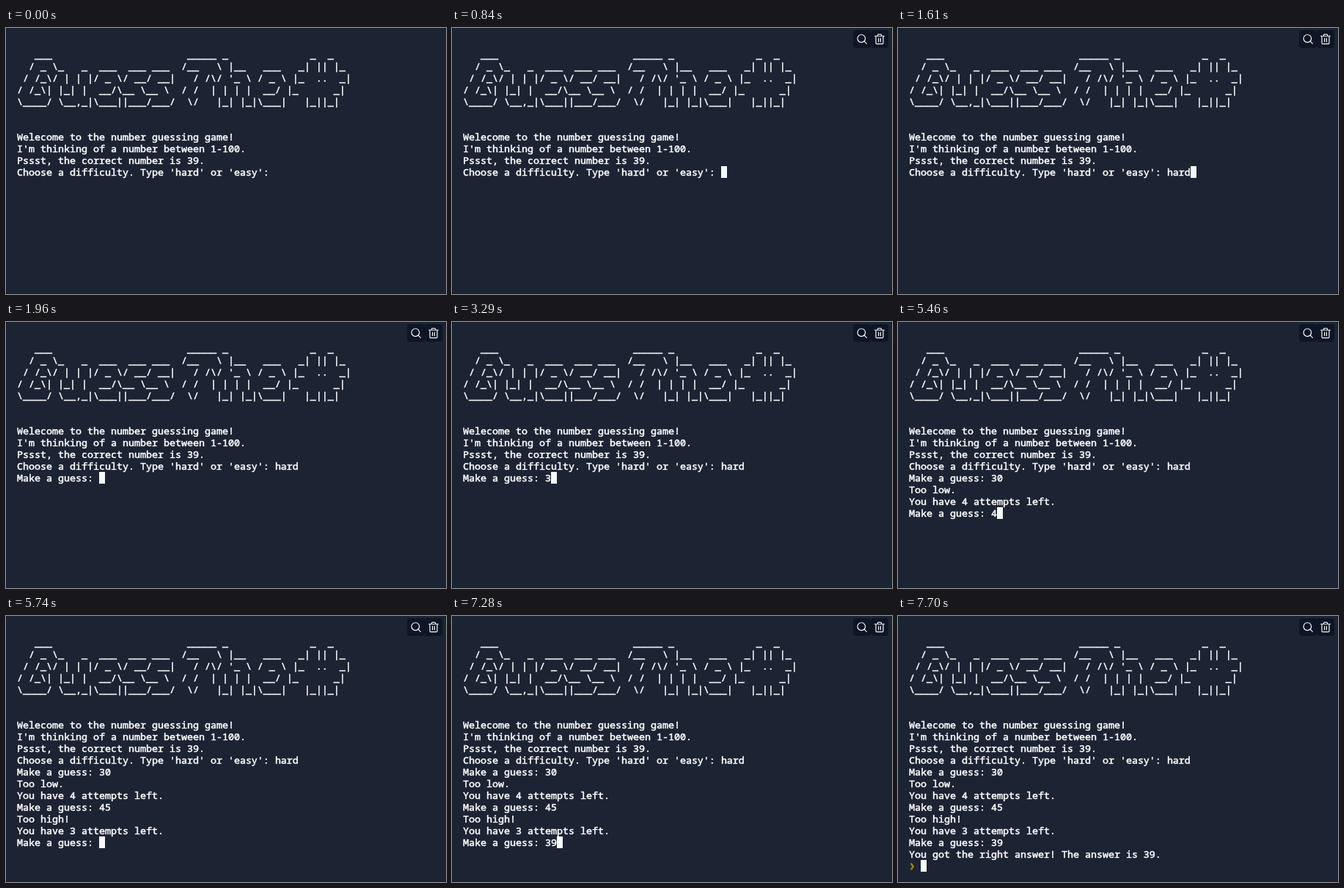
Recreate the animation shown at these times as an HTML page. Size 600 by 362 pixels, loop 8.82 s.

```html
<!DOCTYPE html>
<html lang="en">
<head>
<meta charset="utf-8">
<title>Number guessing game</title>
<style>
  html, body { margin: 0; width: 100%; height: 100%; overflow: hidden; background: #0e1525; }
  #terminal { position: relative; width: 600px; height: 362px; background: #1c2333; border-radius: 4px; }
  pre {
    position: absolute; left: 15px; top: 28px; margin: 0;
    font: 500 13.3333px/16px "Noto Sans Mono", "DejaVu Sans Mono", monospace;
    font-variant-ligatures: none; color: #fff; -webkit-text-stroke: 0.5px #fff;
  }
  #prompt {
    display: inline-block; box-sizing: border-box; width: 16px; height: 16px;
    padding-left: 1px; vertical-align: top;
    font: bold 11px/17px "DejaVu Sans Mono", monospace;
    color: #a08a17; -webkit-text-stroke: 0.8px #a08a17;
  }
  #cursor { display: inline-block; width: 8px; height: 16px; vertical-align: top; background: #f5f9fc; }
  #tools { position: absolute; left: 547px; top: 3px; }
  #tools rect { fill: #0e1525; }
  #tools path, #tools circle { fill: none; stroke: #f5f9fc; stroke-width: 1.2; stroke-linecap: round; stroke-linejoin: round; }
  .off { visibility: hidden; }
</style>
</head>
<body>
<div id="terminal">
<pre>
   ___                       _____ _              _  _
  / _ \_   _  ___  ___ ___  /__   \ |__   ___   _| || |_
 / /_\/ | | |/ _ \/ __/ __|   / /\/ '_ \ / _ \ |_  ..  _|
/ /_\| |_| |  __/\__ \__ \  / /  | | | |  __/ |_      _|
\____/ \__,_|\___||___/___/  \/   |_| |_|\___|   |_||_|


Welecome to the number guessing game!
I'm thinking of a number between 1-100.
Pssst, the correct number is 39.
Choose a difficulty. Type 'hard' or 'easy': <span id="log"></span><span id="prompt">❯</span><span id="cursor"></span></pre>
  <svg id="tools" width="48" height="24">
    <rect width="24" height="24" rx="4"/>
    <rect x="24" width="24" height="24" rx="4"/>
    <circle cx="11.3" cy="11.3" r="5.3"/>
    <path d="M15.2 15.2 18.3 18.3"/>
    <path d="M29.5 8h13M33.5 8V6.5q0-1 1-1h3q1 0 1 1V8M31 8v9.5q0 1.2 1.2 1.2h7.6q1.2 0 1.2-1.2V8M34.6 11v4.7M37.4 11v4.7"/>
  </svg>
</div>
<script>
  const LOOP = 8820, FOCUS = 840, DONE = 7700;
  const ASK = "Make a guess: ";
  const reply = (verdict, left) => `\n${verdict}\nYou have ${left} attempts left.\n${ASK}`;

  // [time in ms, text appended]
  const output = [
    [1470, "ha"], [1540, "r"], [1610, "d"],
    [1960, "\n" + ASK],
    [3290, "3"], [3430, "0"], [3710, reply("Too low.", 4)],
    [5460, "4"], [5600, "5"], [5740, reply("Too high!", 3)],
    [7280, "39"],
    [DONE, "\nYou got the right answer! The answer is 39.\n"],
  ];

  const [log, prompt, cursor, tools] =
    ["log", "prompt", "cursor", "tools"].map(id => document.getElementById(id));

  function draw() {
    const t = performance.now() % LOOP;
    const text = output.filter(([at]) => at <= t).map(([, s]) => s).join("");
    if (log.textContent !== text) log.textContent = text;
    prompt.style.display = t >= DONE ? "" : "none";
    for (const el of [cursor, tools]) el.classList.toggle("off", t < FOCUS);
    requestAnimationFrame(draw);
  }
  draw();
</script>
</body>
</html>
```
